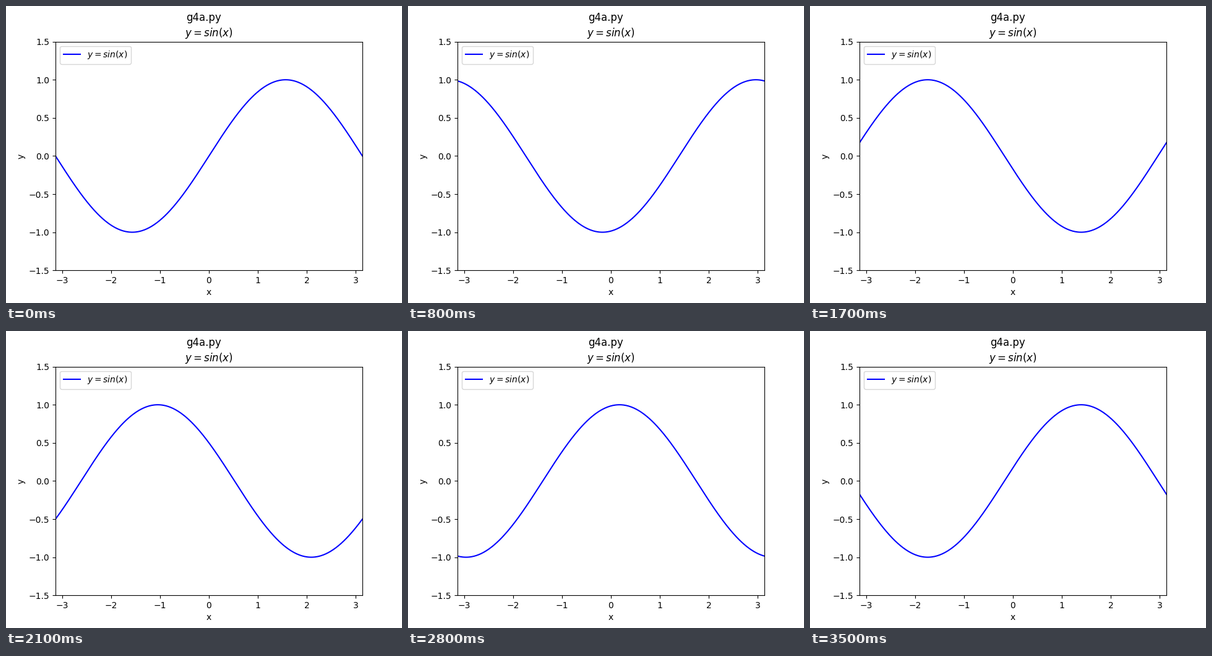
Animation of 640x480 px, one loop 3600 ms. Source, as a matplotlib script:

```python
import numpy as np
import matplotlib.pyplot as plt
from matplotlib.animation import FuncAnimation

FRAMES = 36
INTERVAL = 100  # ms

fig, ax = plt.subplots(figsize=(6.4, 4.8), dpi=100)
fig.suptitle("g4a.py")
ax.set_title("$y=sin(x)$")
ax.set_xlabel("x")
ax.set_ylabel("y")
ax.set_xlim(-np.pi, np.pi)
ax.set_ylim(-1.5, 1.5)

x = np.linspace(-np.pi, np.pi, 361)
(wave,) = ax.plot(x, np.sin(x), color="blue", label="$y=sin(x)$")
ax.legend(loc="upper left")


def update(frame):
    """Shift the wave right by one equal share of a full period per frame."""
    wave.set_ydata(np.sin(x - 2 * np.pi * frame / FRAMES))
    return (wave,)


anim = FuncAnimation(fig, update, frames=FRAMES, interval=INTERVAL,
                     repeat=True, repeat_delay=0)
plt.show()
```
